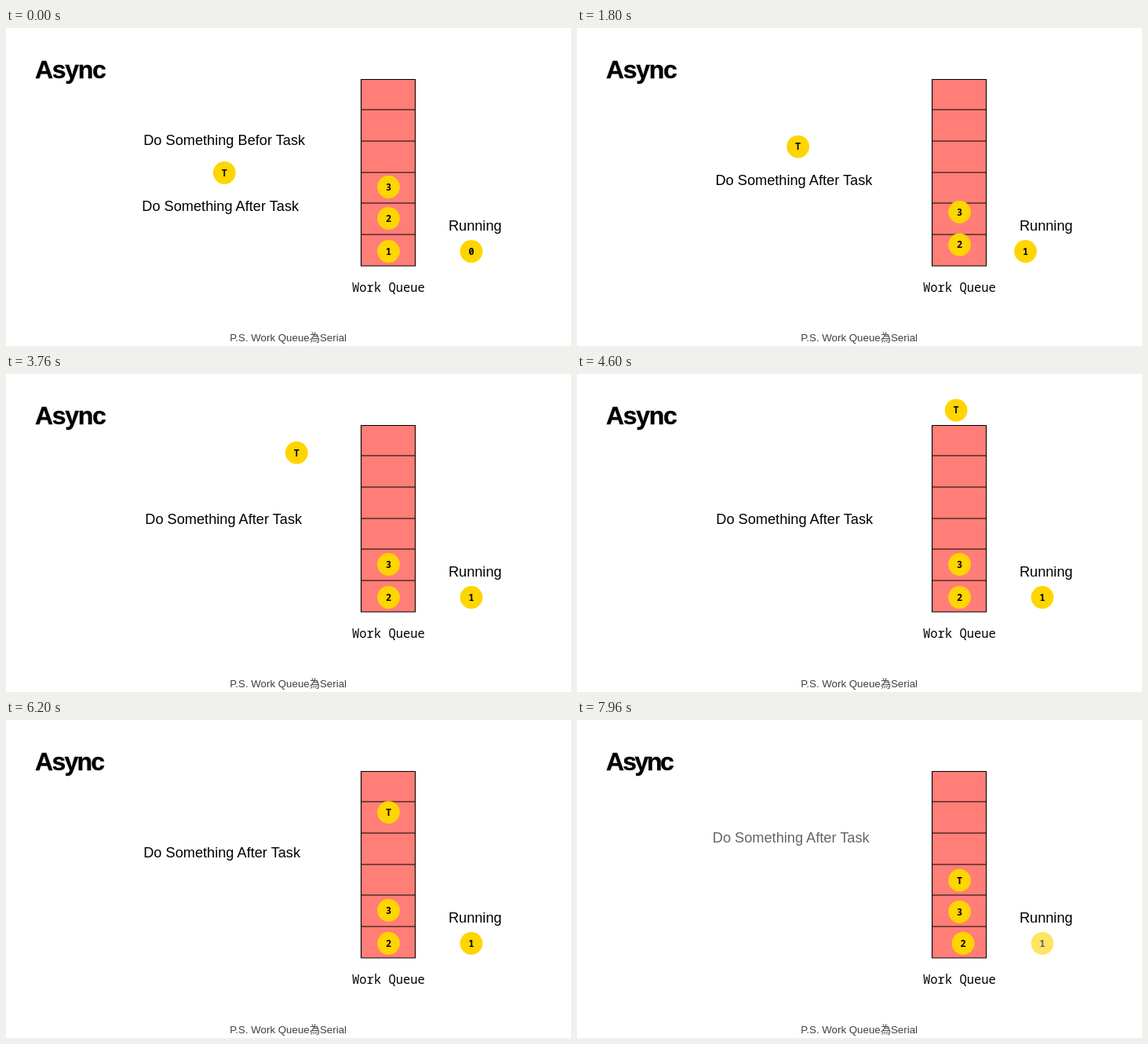
These frames come from a looping animation (720 px wide and 405 px high, 8 s). An HTML page:

```html
<!DOCTYPE html>
<html lang="en">
<head>
<meta charset="utf-8">
<title>Async</title>
<style>
  html, body { margin: 0; width: 100%; height: 100%; overflow: hidden; background: #fff; }
  svg { display: block; width: 100%; height: 100%; }
  text { font-family: "Liberation Sans", Arial, sans-serif; font-size: 18.2px; }
  .title { font-size: 32px; font-weight: 700; stroke: #000; stroke-width: .35px; }
  .note { font-size: 13.3px; fill: #404040; text-anchor: middle;
    font-family: "Liberation Sans", "Noto Sans CJK TC", "Noto Sans CJK JP", "Noto Sans CJK", sans-serif; }
  .mono, .ball text { font-family: "Noto Sans Mono", "DejaVu Sans Mono", monospace; text-anchor: middle; }
  .mono { font-size: 15.5px; font-weight: 500; }
  .ball text { font-size: 11.8px; font-weight: 700; }
  .ball circle { fill: #ffd500; }
</style>
</head>
<body>
<svg id="stage" viewBox="0 0 720 405">
  <text class="title" id="title" y="64">Async</text>
  <path d="M452.5 65.5h69v237.5h-69zM452.5 104h69m-69 40h69m-69 40h69m-69 39h69m-69 40h69"
    fill="#ff7e77" stroke="#000" stroke-width="1.1"/>
  <text class="mono" x="487.4" y="336">Work Queue</text>
  <text x="563.9" y="258.4">Running</text>
  <text class="note" x="359.6" y="399">P.S. Work Queue為Serial</text>
</svg>
<script>
const LOOP = 8000, FRAME = 40, MOVE = 1920, FADE = 640;
const STARTS = [480, 2880, 5280, 7680];
const stage = document.getElementById('stage');
const title = document.getElementById('title');

function add(parent, tag, attrs, label) {
  const el = document.createElementNS('http://www.w3.org/2000/svg', tag);
  for (const k in attrs) el.setAttribute(k, attrs[k]);
  if (label) el.textContent = label;
  return parent.appendChild(el);
}

function ball(label) {
  const g = add(stage, 'g', { class: 'ball' });
  add(g, 'circle', { r: 14.4 });
  add(g, 'text', { y: 4.3 }, label);
  return g;
}

const line = label => add(stage, 'text', {}, label);

// from: resting place; moves: step -> new place; fade: step in which it dissolves
const items = [
  { el: line('Do Something Befor Task'), from: [175.2, 149.2], moves: {}, fade: 0 },
  { el: line('Do Something After Task'), from: [173.3, 233.4],
    moves: { 0: [177.3, 191.2], 2: [172.8, 156] }, fade: 3 },
  { el: ball('0'), from: [593, 284.5], moves: {}, fade: 0 },
  { el: ball('1'), from: [487.5, 284.5], moves: { 0: [593, 284.5] }, fade: 3 },
  { el: ball('2'), from: [487.5, 242.5], moves: { 0: [487.5, 284.5], 3: [593, 284.5] } },
  { el: ball('3'), from: [487.5, 202.5], moves: { 0: [487.5, 242.5], 3: [487.5, 284.5] } },
  { el: ball('T'), from: [278.3, 184.5],
    moves: { 0: [282.5, 142.5], 1: [487.5, 44], 2: [487.5, 202.5], 3: [487.5, 242.5] } }
];
const letters = [36.9, 58.7, 75.2, 91.7, 110];
const tighten = [0, 0.4, 1.6, 2.8, 4];

// cubic-bezier(.42, 0, .58, 1)
function ease(x) {
  if (x <= 0) return 0;
  if (x >= 1) return 1;
  let lo = 0, hi = 1;
  for (let i = 0; i < 24; i++) {
    const u = (lo + hi) / 2, v = 1 - u;
    if (1.26 * u * v * v + 1.74 * u * u * v + u * u * u < x) lo = u; else hi = u;
  }
  return lo * lo * (3 - 2 * lo);
}

function draw(time) {
  const t = Math.floor((time % LOOP) / FRAME) * FRAME;
  const step = STARTS.map(s => ease((t - s) / MOVE));
  for (const { el, from, moves, fade } of items) {
    let [x, y] = from;
    for (const k in moves) {
      x += (moves[k][0] - x) * step[k];
      y += (moves[k][1] - y) * step[k];
    }
    el.setAttribute('transform', `translate(${x.toFixed(3)} ${y.toFixed(3)})`);
    if (fade !== undefined) el.setAttribute('opacity', 1 - ease((t - STARTS[fade]) / FADE));
  }
  title.setAttribute('x', letters.map((x, i) => x - tighten[i] * step[2]).join(' '));
}

const begin = performance.now();
function tick() {
  draw(performance.now() - begin);
  requestAnimationFrame(tick);
}
tick();
</script>
</body>
</html>
```
